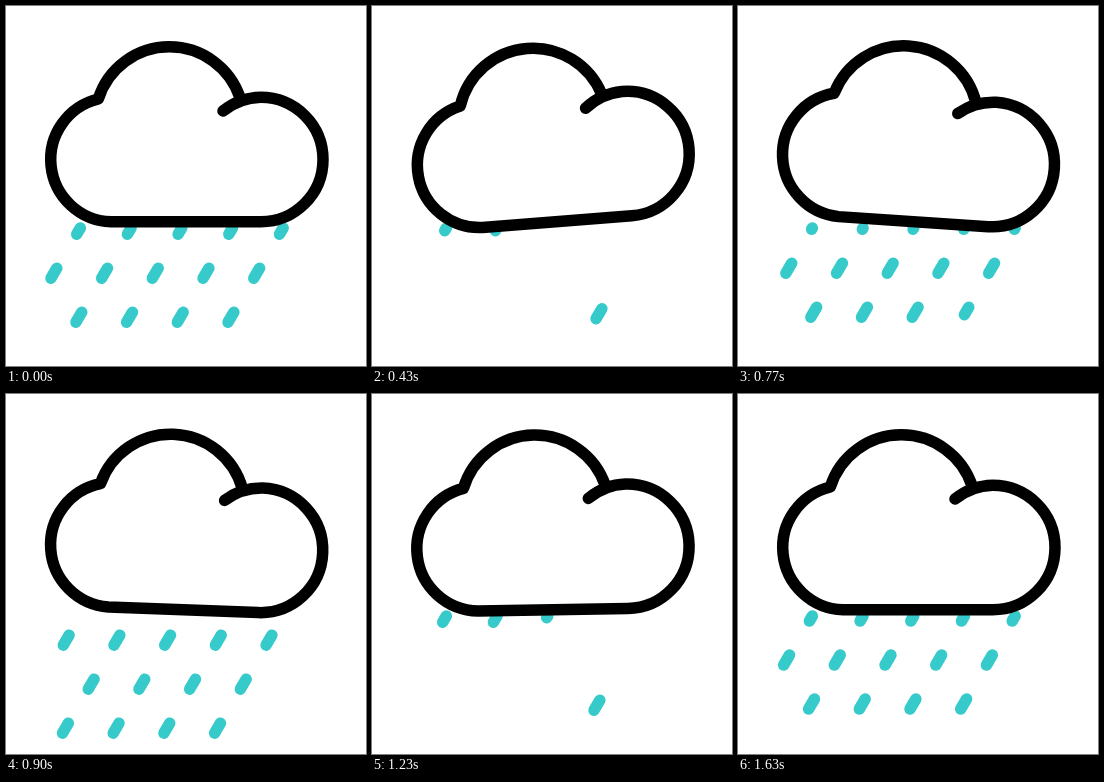
These frames come from a looping animation (360 by 360 pixels, 1.67 s). An HTML page:

```html
<!DOCTYPE html>
<html lang="en">
<head>
<meta charset="utf-8">
<title>Rain cloud</title>
<style>
  html, body { margin: 0; width: 100%; height: 100%; overflow: hidden; background: #fff; }
  svg { display: block; width: 100vw; height: 100vh; }
  path { stroke-width: 11.5; stroke-linecap: round; stroke-linejoin: round; }
</style>
</head>
<body>
<svg viewBox="0 0 360 360">
  <path id="rain" fill="none" stroke="#36caca"/>
  <path id="cloud" fill="#fff" stroke="#000"
    d="M217 105A62 62 0 0 1 254.7 91.2A62.3 62.3 0 0 1 254.7 215.8H105A62.3 62.3 0 0 1 92.3 93A74.5 74.5 0 0 1 234.3 92.5"/>
</svg>
<script>
const LOOP = 1670;
const GAP = 44;           // vertical distance between rows
const CYCLE = 4 * GAP;    // distance fallen in one shower
const HALF = 5;           // half the height of a drop
const COLS = 5;

// [time, value]
const SWING = [[0, 0], [420, -4.5], [790, 3.9], [1100, -2], [1350, 0], [LOOP, 0]];
const FALL = [[0, 0], [570, 112], [770, 171], [1070, 235.5], [1370, 289], [1630, 351], [LOOP, 2 * CYCLE]];

const rain = document.getElementById('rain');
const cloud = document.getElementById('cloud');
const clamp = v => Math.min(1, Math.max(0, v));
const linear = u => u;
const smooth = u => u * u * (3 - 2 * u);

function tween(keys, t, ease) {
  const i = keys.findIndex(key => key[0] > t);
  const [t0, a] = keys[i - 1], [t1, b] = keys[i];
  return a + (b - a) * ease((t - t0) / (t1 - t0));
}

// Fall distance at which a drop has shrunk away; the right column lasts longest
function goneAt(row, col) {
  if (row === 2) return 40 + .284 * 4 ** col;
  if (row === 3) return 53 + 1.5 * col;
  return Infinity;
}

// Fall distance at which a drop starts to grow
const bornAt = (row, col) => row === 4 ? 40 * col : -CYCLE;

function drop(row, col, fall) {
  const gone = goneAt(row, col), born = bornAt(row, col);
  if (fall > gone || fall < born) return '';

  const start = 222, end = col ? 343 : 279;
  const y = 223 + fall + GAP * (2 - row);
  let top = y - HALF, bottom = y + HALF;
  top += 2 * HALF * clamp(1 - (gone - fall) / 3);
  bottom = Math.min(bottom, top + 2 * HALF * clamp((fall - born) / 15));
  if (bottom < start || top > end) return '';

  const point = h => (48 + 50.7 * col - .585 * (h - 267)).toFixed(2) + ' ' + h.toFixed(2);
  return 'M' + point(Math.max(top, start)) + 'L' + point(Math.min(bottom, end));
}

function draw(t) {
  const fall = tween(FALL, t, linear) % CYCLE;
  let d = '';
  for (let row = 0; row < 8; row++)
    for (let col = 0; col < COLS; col++) d += drop(row, col, fall);
  rain.setAttribute('d', d);
  cloud.setAttribute('transform', `rotate(${tween(SWING, t, smooth).toFixed(3)} 180 148)`);
}

const began = performance.now();
function tick() {
  draw((performance.now() - began) % LOOP);
  requestAnimationFrame(tick);
}
tick();
</script>
</body>
</html>
```
